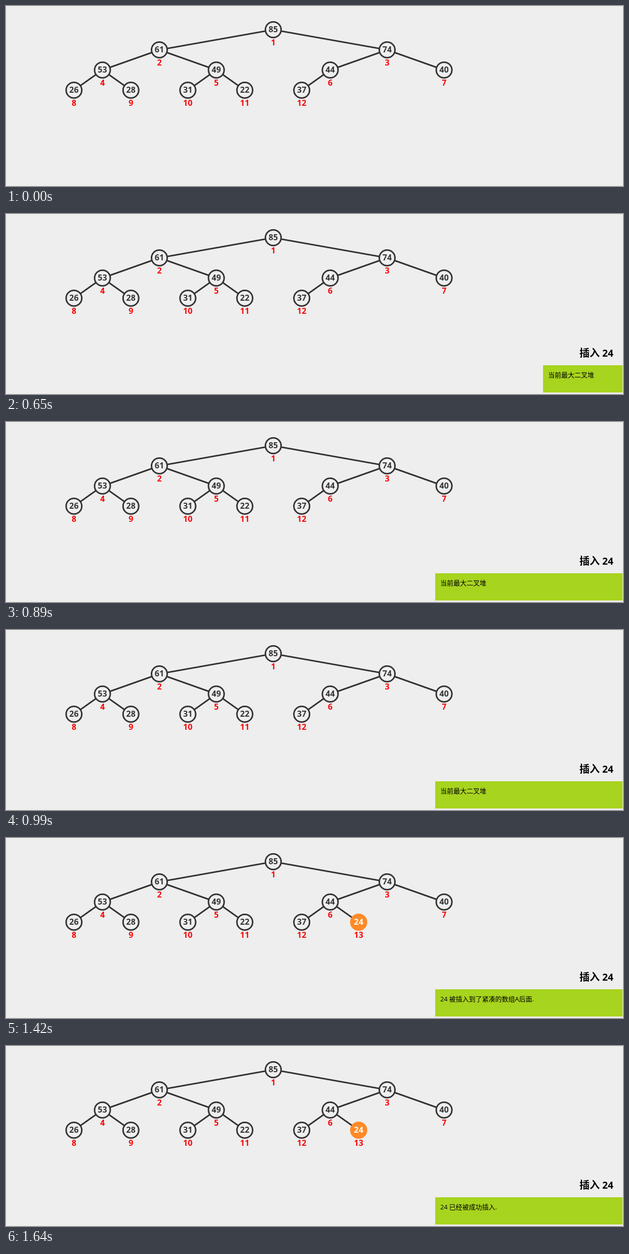
Recreate the animation shown at these times as an HTML page with a canvas. Size 1219x357 px, loop 1880 ms.

```html
<!DOCTYPE html>
<html lang="zh">
<head>
<meta charset="utf-8">
<title>最大二叉堆</title>
<style>
html, body { margin: 0; width: 100%; height: 100%; overflow: hidden; background: #eee; }
canvas { display: block; }
</style>
</head>
<body>
<canvas id="stage" width="1219" height="357"></canvas>
<script>
const ctx = document.getElementById('stage').getContext('2d');
const LOOP = 1880;
const TICKS = [0, 550, 650, 770, 890, 990, 1110, 1210, 1320, 1420, 1540, 1640];
const HEAP = [85, 61, 74, 53, 49, 44, 40, 26, 28, 31, 22, 37, 24];
const LATIN = '"Open Sans", "Noto Sans", sans-serif';
const CJK = '"Noto Sans CJK SC", "Noto Sans CJK", sans-serif';
const DARK = [51, 51, 51], PALE = [238, 238, 238], ORANGE = [255, 138, 39], WHITE = [255, 255, 255];

const clamp = v => Math.min(1, Math.max(0, v));
const swing = p => 0.5 - Math.cos(Math.PI * clamp(p)) / 2;
const cubic = p => (p = clamp(p)) < 0.5 ? 4 * p ** 3 : 1 - 4 * (1 - p) ** 3;
const mix = (a, b, k) => `rgb(${a.map((v, i) => Math.round(v + (b[i] - v) * k))})`;

// Place of heap slot n, counted from 1
function place(n) {
  const depth = Math.floor(Math.log2(n));
  const col = n - 2 ** depth;
  return { x: 78 + 900 * (2 * col + 1) / 2 ** (depth + 1), y: 47 + 40 * depth };
}

function label(text, x, y, size, color) {
  ctx.font = `700 ${size}px ${LATIN}`;
  ctx.textAlign = 'center';
  ctx.fillStyle = color;
  ctx.fillText(text, x, y);
}

// Text with Chinese and Latin runs
function mixed(text, x, y, size, weight) {
  ctx.textAlign = 'left';
  ctx.fillStyle = '#000';
  for (const run of text.match(/[\x20-\x7e]+|[^\x20-\x7e]+/g)) {
    const latin = run.charCodeAt(0) < 127;
    ctx.font = `${weight} ${latin ? size * 0.96 : size}px ${latin ? LATIN : CJK}`;
    ctx.fillText(run, x, y);
    x += ctx.measureText(run).width;
  }
}

function edge(n, k) {
  const a = place(n >> 1), b = place(n);
  ctx.beginPath();
  ctx.moveTo(a.x, a.y);
  ctx.lineTo(a.x + (b.x - a.x) * k, a.y + (b.y - a.y) * k);
  ctx.strokeStyle = '#333';
  ctx.lineWidth = 3;
  ctx.stroke();
}

// scale sets the size, heat blends from plain to highlighted
function node(n, scale, heat) {
  const { x, y } = place(n);
  ctx.beginPath();
  ctx.arc(x, y, 15.5 * scale, 0, Math.PI * 2);
  ctx.fillStyle = mix(PALE, ORANGE, heat);
  ctx.fill();
  ctx.strokeStyle = mix(DARK, ORANGE, heat);
  ctx.lineWidth = 3 * scale;
  ctx.stroke();
  label(HEAP[n - 1], x, y + 5.3, 16 * scale, mix(DARK, WHITE, heat));
  label(n, x, y + 31, 16 * scale, '#f00');
}

function tree(t) {
  const k = cubic((t - 1079) / 280);
  const added = k > 0.02;
  for (let n = 2; n <= 12; n++) edge(n, 1);
  if (added) edge(13, k);
  for (let n = 1; n <= 12; n++) node(n, 1, 0);
  if (added) node(13, k, k);
}

function message(t) {
  if (t < 1110) return '当前最大二叉堆';
  return t < 1640 ? '24 被插入到了紧凑的数组A后面.' : '24 已经被成功插入.';
}

function panel(t) {
  if (t < 550) return;
  mixed('插入 24', 1133, 283, 20, 700);
  const w = Math.round(370 * swing((t - 538.7) / 246));
  ctx.save();
  ctx.beginPath();
  ctx.rect(1218 - w, 300, w, 54);
  ctx.clip();
  ctx.fillStyle = '#a7d41e';
  ctx.fillRect(1218 - w, 300, w, 54);
  mixed(message(t), 1228 - w, 324, 13, 400);
  ctx.restore();
}

function draw(now) {
  const time = now % LOOP;
  const t = TICKS.filter(v => v <= time).pop();
  ctx.fillStyle = '#eee';
  ctx.fillRect(0, 0, 1219, 357);
  tree(t);
  panel(t);
}

const start = performance.now();
function frame() {
  draw(performance.now() - start);
  requestAnimationFrame(frame);
}
frame();
</script>
</body>
</html>
```
